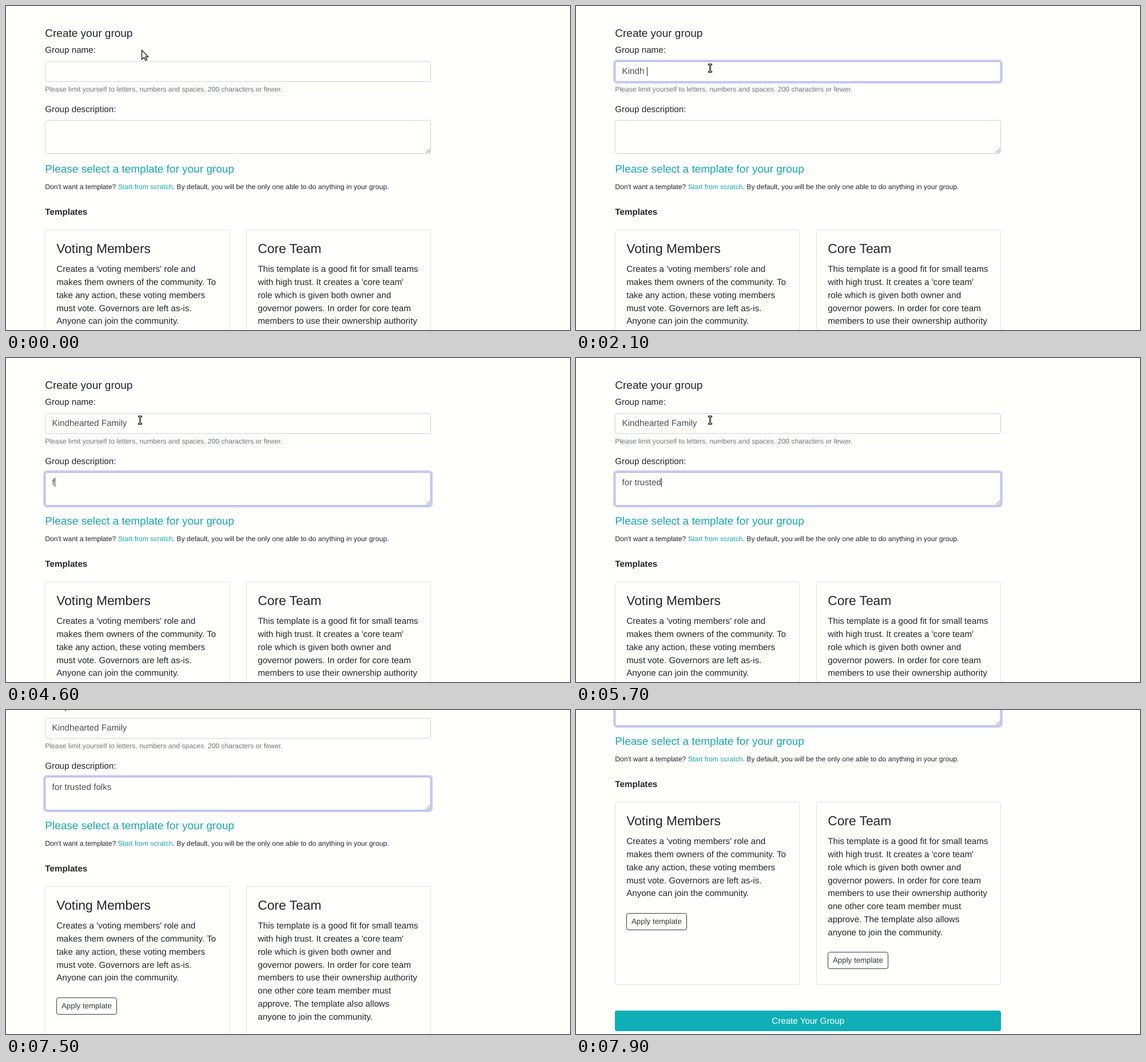
An HTML page with a canvas that plays this animation: 986 by 568 pixels, repeating every 8 s.

```html
<!DOCTYPE html>
<html lang="en">
<head>
<meta charset="utf-8">
<title>Create your group</title>
<style>
  html, body { margin: 0; width: 100%; height: 100%; overflow: hidden; background: #fffffc; }
  canvas { display: block; }
</style>
</head>
<body>
<canvas id="stage" width="986" height="568"></canvas>
<script>
const ctx = document.getElementById('stage').getContext('2d');
const LOOP = 8000, TICK = 100;
const PAPER = '#fffffc', INK = '#212529', FIELD_INK = '#495057', MUTED = '#6c757d';
const TEAL = '#18a5b4', BUTTON = '#0eafb6', FIELD_LINE = '#ced4da', CARD_LINE = '#dfdfdc';
const FOCUS_LINE = '#a2a7e6', FOCUS_RING = '#cbcef7';
const LEFT = 68.3, FIELD_X = 80.6, WIDTH = 675, LINE = 22.8;
const BODY = 15.2, HEADING = 19, TITLE = 22.8, SMALL = 12.16, LABEL = 13.3;

const CARDS = [
  { x: 68, title: 'Voting Members', lines: [
    "Creates a 'voting members' role and",
    'makes them owners of the community. To',
    'take any action, these voting members',
    'must vote. Governors are left as-is.',
    'Anyone can join the community.'] },
  { x: 420, title: 'Core Team', lines: [
    'This template is a good fit for small teams',
    "with high trust. It creates a 'core team'",
    'role which is given both owner and',
    'governor powers. In order for core team',
    'members to use their ownership authority',
    'one other core team member must',
    'approve. The template also allows',
    'anyone to join the community.'] }
];

// Progress from 0 to 1 between two ticks.
const ramp = (tick, from, to) => Math.min(1, Math.max(0, (tick - from) / (to - from)));
const easeOut = u => 1 - (1 - u) ** 2;
const typed = (str, tick, from, to) => str.slice(0, Math.round(str.length * ramp(tick, from, to)));

function nameAt(tick) {
  const slip = tick >= 21 && tick < 24 ? ' ' : '';
  return typed('Kindh', tick, 15, 19) + slip + typed('earted Family', tick, 24, 43);
}

const aboutAt = tick => typed('for trusted folks', tick, 45, 64);

const scrollAt = tick => Math.round(231 * easeOut(ramp(tick, 74, 79)));

function pointerAt(tick) {
  const enter = easeOut(ramp(tick, 3, 7));
  const leave = Math.max(0, tick - 67);
  return [Math.round(237 - 3 * enter + 278 * leave), Math.round(77 + 31 * enter - 52 * leave)];
}

// Draws text and returns the x where it ends.
function text(str, x, y, size = BODY, color = INK, weight = '') {
  ctx.font = `${weight} ${size}px "Liberation Sans", Arial, sans-serif`;
  ctx.textRendering = 'geometricPrecision';
  ctx.fillStyle = color;
  ctx.fillText(str, x, Math.round(y));
  return x + ctx.measureText(str).width;
}

function fillBox(x, y, w, h, r, color) {
  ctx.fillStyle = color;
  ctx.beginPath();
  ctx.roundRect(x, y, w, h, r);
  ctx.fill();
}

function box(x, y, w, h, color) {
  ctx.strokeStyle = color;
  ctx.lineWidth = 1;
  ctx.beginPath();
  ctx.roundRect(x + 0.5, y + 0.5, w - 1, h - 1, 3.3);
  ctx.stroke();
}

function field(y, h, focus) {
  ctx.globalAlpha = focus;
  fillBox(65, y - 3, WIDTH + 6, h + 6, 6.8, FOCUS_RING);
  ctx.globalAlpha = 1;
  fillBox(68, y, WIDTH, h, 3.8, PAPER);
  box(68, y, WIDTH, h, FIELD_LINE);
  ctx.globalAlpha = focus;
  box(68, y, WIDTH, h, FOCUS_LINE);
  ctx.globalAlpha = 1;
}

function caret(x, baseline) {
  ctx.fillStyle = INK;
  ctx.fillRect(Math.round(x), baseline - 13, 1, 16);
}

function path(points) {
  ctx.beginPath();
  points.forEach(([x, y]) => ctx.lineTo(x, y));
}

function grip() {
  ctx.strokeStyle = '#666';
  ctx.lineWidth = 1;
  for (const d of [7, 3]) {
    path([[741 - d, 257.5], [741.5, 257 - d]]);
    ctx.stroke();
  }
}

function card({ x, title, lines }) {
  const inner = x + 20;
  box(x, 392, 323, 321, CARD_LINE);
  text(title, inner + 0.2, 433, TITLE);
  lines.forEach((str, i) => text(str, inner + 0.2, 466.2 + i * LINE));
  const top = Math.round(472.9 + lines.length * LINE);
  box(inner, top, 106, 30, '#343a40');
  text('Apply template', inner + 9, top + 19, LABEL, '#343a40');
}

function arrow(x, y) {
  ctx.save();
  ctx.translate(x + 0.5, y + 0.5);
  path([[0, 0], [0, 16], [3.8, 12.6], [6.4, 18], [8.9, 17], [6.4, 11.6], [11.2, 11.6]]);
  ctx.closePath();
  ctx.fillStyle = '#fff';
  ctx.fill();
  ctx.strokeStyle = '#111';
  ctx.lineWidth = 1.3;
  ctx.stroke();
  ctx.restore();
}

// A text cursor with a light core and a dark outline.
function beam(x, y) {
  for (const [color, pad] of [['#111', 1], ['#ddd', 0]]) {
    const bar = (dx, dy, w, h) => ctx.fillRect(x + dx - pad, y + dy - pad, w + 2 * pad, h + 2 * pad);
    ctx.fillStyle = color;
    bar(-2, -6, 5, 1);
    bar(-2, 7, 5, 1);
    bar(0, -6, 1, 14);
  }
}

function page(tick) {
  const swap = ramp(tick, 43, 44);

  text('Create your group', LEFT, 54, HEADING);
  text('Group name:', LEFT, 82);
  field(97, 36, ramp(tick, 8, 10) * (1 - swap));
  const nameEnd = text(nameAt(tick), FIELD_X, 119, BODY, FIELD_INK);
  if (tick >= 9 && swap < 1) caret(nameEnd, 120);
  text('Please limit yourself to letters, numbers and spaces. 200 characters or fewer.',
    LEFT, 150, SMALL, MUTED);

  text('Group description:', LEFT, 186);
  field(200, 59, swap);
  grip();
  const aboutEnd = text(aboutAt(tick), FIELD_X, 223, BODY, FIELD_INK);
  const blinkedOff = tick >= 70 && tick < 76;
  if (swap === 1 && !blinkedOff) caret(aboutEnd, 223);

  text('Please select a template for your group', LEFT, 292, HEADING, TEAL);
  let x = text("Don't want a template? ", LEFT, 321, SMALL);
  x = text('Start from scratch', x, 321, SMALL, TEAL);
  text('. By default, you will be the only one able to do anything in your group.', x, 321, SMALL);
  text('Templates', LEFT, 366, BODY, INK, 'bold');
  CARDS.forEach(card);

  fillBox(68, 758, WIDTH, 36, 3.8, BUTTON);
  ctx.textAlign = 'center';
  text('Create Your Group', 68 + WIDTH / 2, 781, BODY, '#fff');
  ctx.textAlign = 'left';
}

function draw(now) {
  const tick = Math.floor((now % LOOP) / TICK);
  ctx.fillStyle = PAPER;
  ctx.fillRect(0, 0, 986, 568);
  ctx.save();
  ctx.translate(0, -scrollAt(tick));
  page(tick);
  ctx.restore();
  const [x, y] = pointerAt(tick);
  const overField = y >= 97 && y < 133;
  (overField ? beam : arrow)(x, y);
}

let start;
function frame(now) {
  start ??= now;
  draw(now - start);
  requestAnimationFrame(frame);
}
draw(0);
requestAnimationFrame(frame);
</script>
</body>
</html>
```
